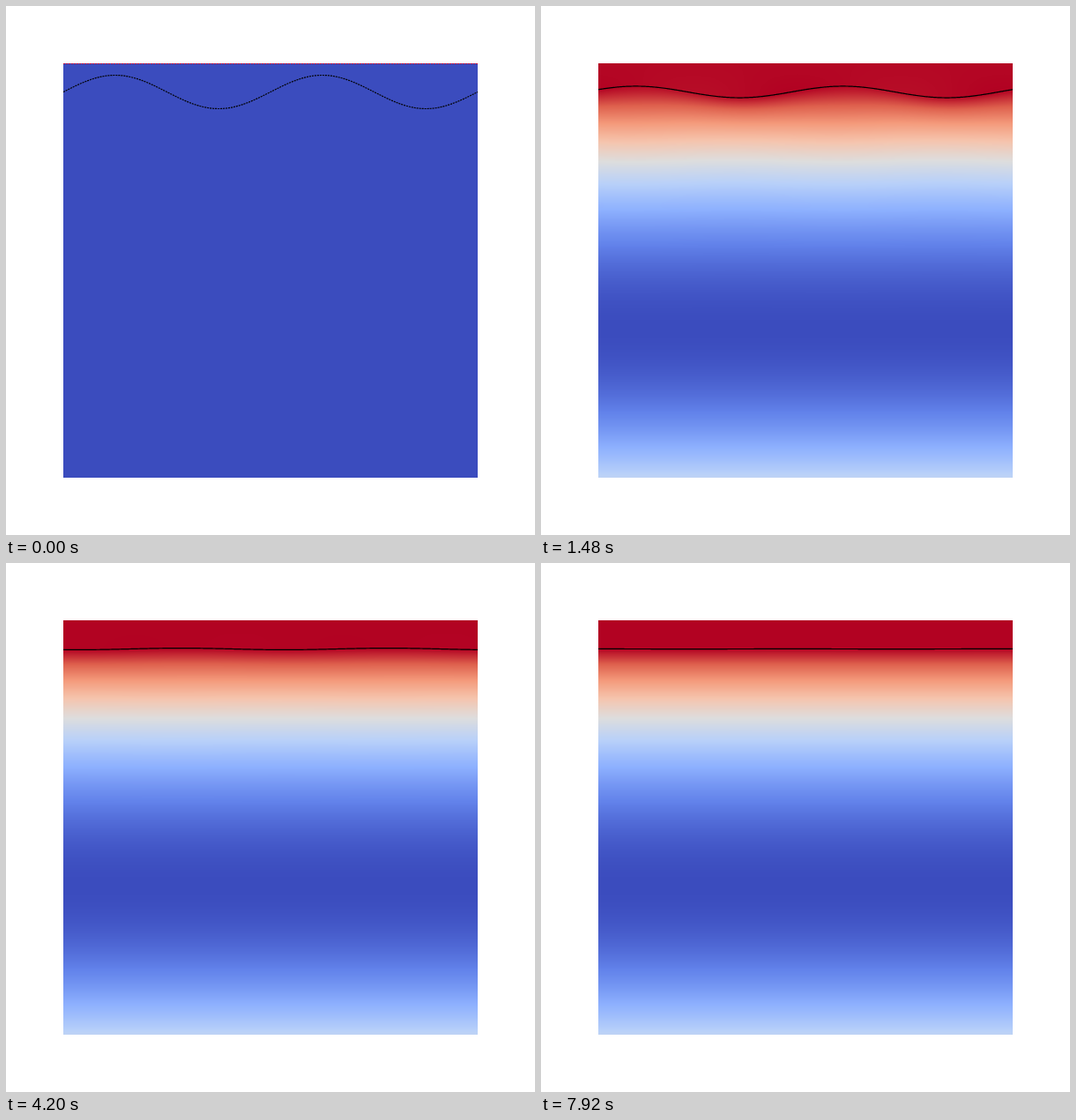
Recreate the animation shown at these times as an HTML page with a canvas. Size 600 px wide and 600 px high, loop 8000 ms.

```html
<!DOCTYPE html>
<html lang="en">
<head>
<meta charset="utf-8">
<title>Shear flow under a decaying wave</title>
<style>
  html, body { margin: 0; width: 100%; height: 100%; overflow: hidden; background: #fff; }
  canvas { display: block; }
</style>
</head>
<body>
<canvas id="stage" width="600" height="600"></canvas>
<script>
const ctx = document.getElementById('stage').getContext('2d');

const LOOP = 8000, STEP = 40, LAST = 7920;
const LEFT = 65, TOP = 65, SIZE = 470;
const REST = 97.5;                 // mean height of the interface
const SLOWEST = 366;               // height of the slowest flow
const K = 4 * Math.PI / SIZE;      // two waves across the box
const SPEED = 0.4655, DECAY = 0.00072, AMP = 19;

// Diverging blue to red colour scale
const STOPS = [
  [59, 76, 190], [98, 130, 234], [141, 176, 254], [184, 208, 249], [221, 221, 221],
  [245, 196, 173], [244, 154, 123], [222, 96, 77], [178, 2, 34]
];
const LEVELS = 1024;
const palette = new Uint32Array(LEVELS + 1);
for (let i = 0; i <= LEVELS; i++) {
  const pos = i / LEVELS * (STOPS.length - 1);
  const n = Math.min(Math.floor(pos), STOPS.length - 2);
  const [r, g, b] = STOPS[n].map((c, j) => Math.round(c + (STOPS[n + 1][j] - c) * (pos - n)));
  palette[i] = (255 << 24 | b << 16 | g << 8 | r) >>> 0;
}

const image = ctx.createImageData(SIZE, SIZE);
const pixels = new Uint32Array(image.data.buffer);

const amplitude = t => AMP * Math.exp(-DECAY * t);
const phase = (x, t) => K * (x - LEFT - SPEED * t);
const surface = (x, t) => REST - amplitude(t) * Math.sin(phase(x, t));

function drawFlow(t) {
  const amp = amplitude(t);
  const ripple = 0.012 * amp / 11;
  const sway = [], height = [];
  for (let i = 0; i < SIZE; i++) {
    const x = LEFT + i + 0.5;
    height[i] = surface(x, t);
    sway[i] = Math.sin(phase(x + 52, t));
  }
  for (let j = 0; j < SIZE; j++) {
    const y = TOP + j + 0.5;
    for (let i = 0; i < SIZE; i++) {
      const depth = y - height[i];
      let v;
      if (depth <= 0) {
        const grow = Math.min(1, (y - TOP) / (REST - TOP));
        v = 1 - ripple * (1 - grow * sway[i]);
      } else {
        const fade = Math.exp(-K * depth);
        const shift = (height[i] - REST) * (1 - K * depth) * fade;
        const q = (y - shift - SLOWEST) / (SLOWEST - REST);
        v = q * q - ripple * fade * (1 - sway[i]);
      }
      pixels[j * SIZE + i] = palette[Math.round(LEVELS * Math.max(0, Math.min(1, v)))];
    }
  }
  ctx.putImageData(image, LEFT, TOP);
}

function drawStart() {
  ctx.fillStyle = '#3b4cbe';
  ctx.fillRect(LEFT, TOP, SIZE, SIZE);
  ctx.fillStyle = '#c01440';
  for (let x = LEFT; x < LEFT + SIZE; x += 3) ctx.fillRect(x, TOP, 2, 1);
}

function drawSurface(t) {
  ctx.beginPath();
  for (let x = LEFT; x <= LEFT + SIZE; x++) ctx.lineTo(x, surface(x, t));
  ctx.setLineDash(t ? [] : [2, 1]);
  ctx.lineWidth = 1.2;
  ctx.strokeStyle = '#000';
  ctx.stroke();
}

let shown = -1;
function frame() {
  const t = Math.min(LAST, Math.floor(performance.now() % LOOP / STEP) * STEP);
  if (t !== shown) {
    shown = t;
    ctx.fillStyle = '#fff';
    ctx.fillRect(0, 0, 600, 600);
    if (t) drawFlow(t); else drawStart();
    drawSurface(t);
  }
  requestAnimationFrame(frame);
}
frame();
</script>
</body>
</html>
```
